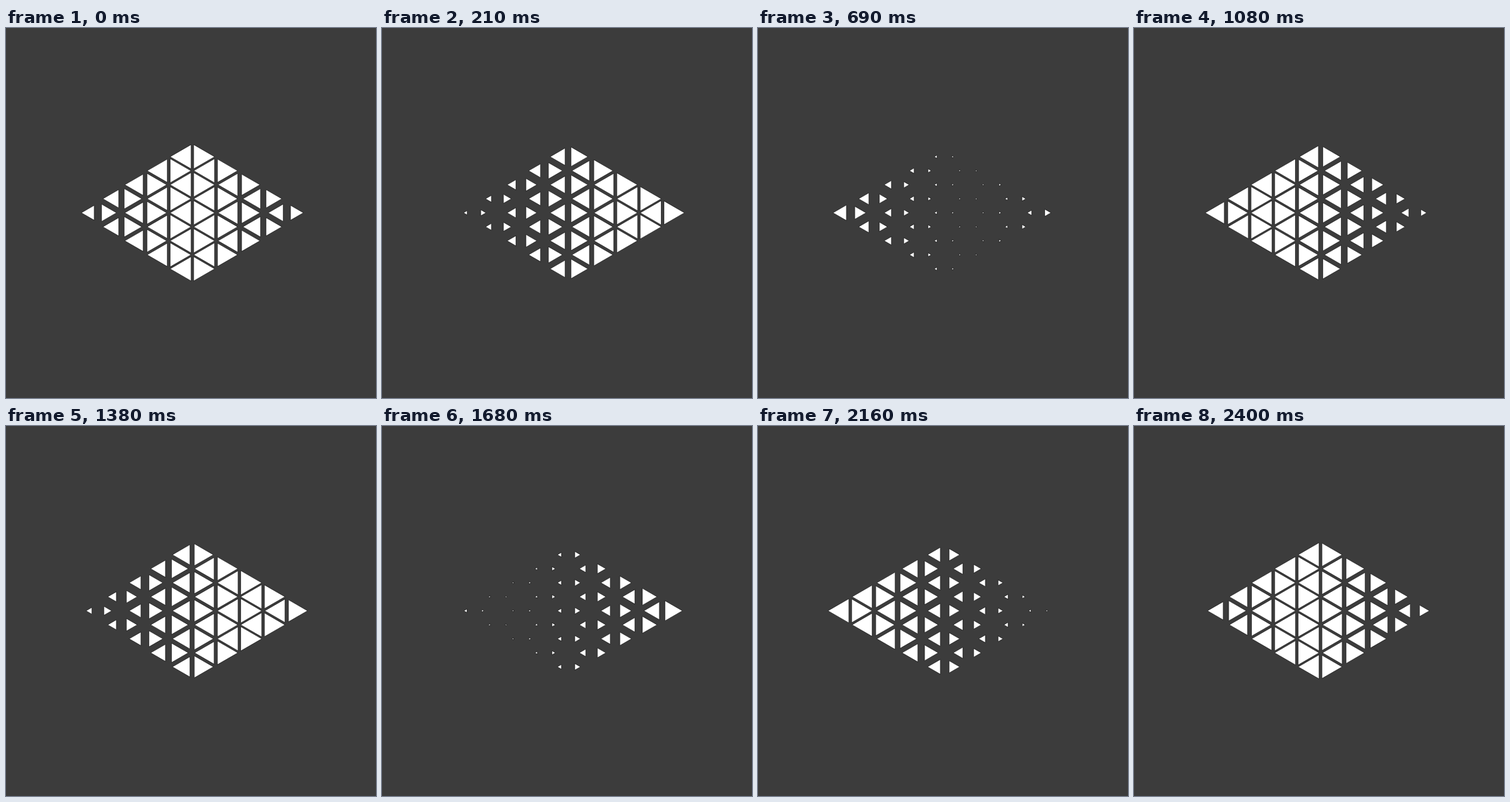
Write an HTML page with a canvas that moves like this. It is 540 px wide and 540 px high and loops after 2460 ms.

```html
<!DOCTYPE html>
<html lang="en">
<head>
<meta charset="utf-8">
<title>Triangle wave</title>
<style>
  html, body { margin: 0; width: 100%; height: 100%; overflow: hidden; background: #3c3c3c; }
  canvas { display: block; }
</style>
</head>
<body>
<canvas id="stage" width="540" height="540"></canvas>
<script>
const ctx = document.getElementById('stage').getContext('2d');

const LOOP = 2460, STEP = 30, LAST_STEP = 80, STEPS_PER_WAVE = 41;
const CENTER = { x: 272, y: 269.7 };
const COLUMN = 34.35, ROW = 40.9, PIVOT = 12.1;
const WAVELENGTH = 668, MIN_RADIUS = 1.6, MAX_RADIUS = 20.5;

function triangle(x, y, r, dir) {
  const half = r * Math.sqrt(3) / 2;
  ctx.beginPath();
  ctx.moveTo(x + dir * r, y);
  ctx.lineTo(x - dir * r / 2, y - half);
  ctx.lineTo(x - dir * r / 2, y + half);
  ctx.closePath();
  ctx.fill();
  ctx.stroke();
}

function radiusAt(dx, step) {
  const phase = 2 * Math.PI * (dx / WAVELENGTH - step / STEPS_PER_WAVE);
  return MIN_RADIUS + (MAX_RADIUS - MIN_RADIUS) * (1 + Math.cos(phase)) / 2;
}

function draw(time) {
  const step = Math.min(Math.floor(time % LOOP / STEP), LAST_STEP);
  ctx.fillStyle = '#3c3c3c';
  ctx.fillRect(0, 0, 540, 540);
  ctx.fillStyle = '#fff';
  ctx.strokeStyle = '#000';
  ctx.lineWidth = 0.6;

  for (let col = -4; col <= 4; col++) {
    const count = 5 - Math.abs(col);
    for (const dir of [-1, 1]) {
      const dx = col * COLUMN + dir * PIVOT;
      const r = radiusAt(dx, step);
      for (let i = 0; i < count; i++) {
        triangle(CENTER.x + dx, CENTER.y + (i - (count - 1) / 2) * ROW, r, dir);
      }
    }
  }
}

const start = performance.now();
function tick() {
  draw(performance.now() - start);
  requestAnimationFrame(tick);
}
tick();
</script>
</body>
</html>
```
